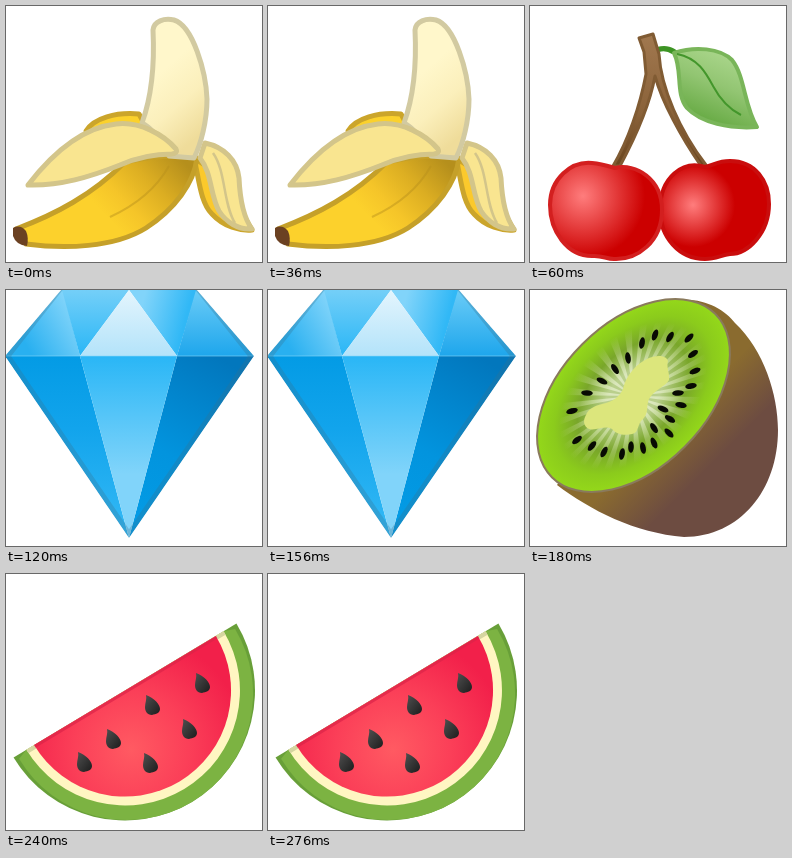
An HTML page that plays this animation: 256x256 px, repeating every 300 ms.

```html
<!DOCTYPE html>
<html lang="en">
<head>
<meta charset="utf-8">
<title>Fruit reel</title>
<style>
html, body { margin: 0; width: 100%; height: 100%; overflow: hidden; background: #fff; }
svg { display: block; width: 100vw; height: 100vh; }
.icon { visibility: hidden; animation: show 300ms step-end infinite; animation-delay: calc(var(--i) * 60ms - 300ms); }
@keyframes show {
  0% { visibility: visible; }
  20%, 100% { visibility: hidden; }
}
</style>
</head>
<body>
<svg viewBox="0 0 256 256" xmlns="http://www.w3.org/2000/svg">
  <defs>
    <linearGradient id="flesh" gradientUnits="userSpaceOnUse" x1="150" y1="70" x2="198" y2="125">
      <stop offset="0" stop-color="#fff7cb"/><stop offset=".5" stop-color="#fbefbb"/><stop offset="1" stop-color="#efdc9a"/>
    </linearGradient>
    <linearGradient id="peel" gradientUnits="userSpaceOnUse" x1="172" y1="150" x2="104" y2="214">
      <stop offset="0" stop-color="#b58f1c"/><stop offset=".4" stop-color="#dcae22"/><stop offset=".75" stop-color="#f5c529"/><stop offset="1" stop-color="#fcd12c"/>
    </linearGradient>
    <radialGradient id="cherryL" gradientUnits="userSpaceOnUse" cx="53" cy="190" r="62">
      <stop offset="0" stop-color="#ff7d7d"/><stop offset="1" stop-color="#cc0000"/>
    </radialGradient>
    <radialGradient id="cherryR" gradientUnits="userSpaceOnUse" cx="163" cy="199" r="42">
      <stop offset="0" stop-color="#ff7d7d"/><stop offset="1" stop-color="#cc0000"/>
    </radialGradient>
    <linearGradient id="stem" x1="0" x2="0" y1="0" y2="1">
      <stop offset="0" stop-color="#a1784f"/><stop offset=".6" stop-color="#8a6239"/><stop offset="1" stop-color="#69451f"/>
    </linearGradient>
    <linearGradient id="leaf" x1=".7" y1=".1" x2=".35" y2=".9">
      <stop offset="0" stop-color="#a9d58a"/><stop offset=".45" stop-color="#92c572"/><stop offset="1" stop-color="#68ab45"/>
    </linearGradient>
    <linearGradient id="gemL" x1="0" x2="0" y1="0" y2="1">
      <stop offset="0" stop-color="#039be5"/><stop offset=".4" stop-color="#12a4ec"/><stop offset="1" stop-color="#35baf6"/>
    </linearGradient>
    <linearGradient id="gemM" x1="0" x2="0" y1="0" y2="1">
      <stop offset="0" stop-color="#29b6f6"/><stop offset=".65" stop-color="#81d4fa"/><stop offset="1" stop-color="#81d4fa"/>
    </linearGradient>
    <linearGradient id="gemR" x1=".7" x2=".3" y1="0" y2="1">
      <stop offset="0" stop-color="#0277bd"/><stop offset=".6" stop-color="#0294de"/><stop offset="1" stop-color="#039be5"/>
    </linearGradient>
    <linearGradient id="gemTop" x1="0" x2="0" y1="0" y2="1">
      <stop offset="0" stop-color="#e4f5fd"/><stop offset="1" stop-color="#b3e3fa"/>
    </linearGradient>
    <linearGradient id="gemUp" x1="0" x2="0" y1="0" y2="1">
      <stop offset="0" stop-color="#74cff8"/><stop offset="1" stop-color="#29b6f6"/>
    </linearGradient>
    <linearGradient id="gemSide" gradientUnits="userSpaceOnUse" x1="20" y1="55" x2="70" y2="25">
      <stop offset="0" stop-color="#29b0f0"/><stop offset="1" stop-color="#81d4fa"/>
    </linearGradient>
    <linearGradient id="gemIn" gradientUnits="userSpaceOnUse" x1="140" y1="0" x2="184" y2="12">
      <stop offset="0" stop-color="#81d4fa"/><stop offset="1" stop-color="#31b8f6"/>
    </linearGradient>
    <linearGradient id="gemOut" x1="0" x2="0" y1="0" y2="1">
      <stop offset="0" stop-color="#6bccf7"/><stop offset="1" stop-color="#1ea6ec"/>
    </linearGradient>
    <linearGradient id="skin" gradientUnits="userSpaceOnUse" x1="106" y1="106" x2="196" y2="196">
      <stop offset=".35" stop-color="#8a6b2f"/><stop offset=".8" stop-color="#6d4c41"/>
    </linearGradient>
    <radialGradient id="pulp">
      <stop offset=".3" stop-color="#b9cf8c"/><stop offset=".58" stop-color="#79a62a"/><stop offset=".82" stop-color="#8bcb1c"/><stop offset="1" stop-color="#94d81a"/>
    </radialGradient>
    <radialGradient id="ray" gradientUnits="userSpaceOnUse" cx="0" cy="0" r="1">
      <stop offset=".35" stop-color="#e6efcc" stop-opacity=".75"/><stop offset="1" stop-color="#d5e8a5" stop-opacity="0"/>
    </radialGradient>
    <radialGradient id="melon" gradientUnits="userSpaceOnUse" cx="125" cy="175" r="115">
      <stop offset="0" stop-color="#ff5a62"/><stop offset=".5" stop-color="#fb3f58"/><stop offset="1" stop-color="#f2204a"/>
    </radialGradient>
    <linearGradient id="pip" x1="0" x2="1" y1="0" y2="1">
      <stop offset="0" stop-color="#505050"/><stop offset="1" stop-color="#1c1c1c"/>
    </linearGradient>
    <clipPath id="gemClip"><path d="M55 0H191L248 66L123 248L-1 66Z"/></clipPath>
  </defs>

  <g class="icon" style="--i:0" stroke-width="5" stroke-linejoin="round">
    <path d="M80 125C88 112 110 106 133 108L145 130L95 148Z" fill="#fbd12c" stroke="#cba52b"/>
    <path d="M188 152C193 172 194 196 206 208C218 221 234 225 246 224L215 170Z" fill="#fbc92c" stroke="#cba52b"/>
    <path d="M10 223C50 208 86 189 119 156C145 150 170 148 191 152C188 177 169 203 140 222C108 242 58 243 20 238Z" fill="url(#peel)" stroke="#c5a029"/>
    <path d="M163 160C150 183 130 199 104 211" fill="none" stroke="#b58f1c" stroke-width="2" opacity=".45"/>
    <path d="M7 222Q14 218 20 225Q23 232 21 240Q10 239 7 230Z" fill="#6b4122"/>
    <path d="M147 24C148 15 158 12 168 14C187 20 200 66 201 93C201 115 195 138 188 152L163 150C155 133 145 122 136 117C144 95 149 65 147 24Z" fill="url(#flesh)" stroke="#d2caa1"/>
    <path d="M22 179C42 153 73 122 110 118C134 115 158 129 170 143Q172 147 166 148C145 148 130 152 114 159C84 171 54 180 22 179Z" fill="#f9e590" stroke="#d3c58a"/>
    <path d="M199 137C218 141 231 154 233 172C234 194 237 211 246 223C232 224 220 216 213 205C204 189 206 167 194 152Z" fill="#f9e590" stroke="#d3c58a"/>
    <path d="M207 147C220 165 217 198 229 217" fill="none" stroke="#d3c58a" stroke-width="2.5"/>
  </g>

  <g class="icon" style="--i:1" stroke-linejoin="round">
    <path d="M127 41C138 38 146 42 151 49L142 48Q136 44 129 46Z" fill="#3d9424"/>
    <path d="M144 47C165 40 190 42 202 54C215 70 214 100 227 121C200 123 171 117 157 102C145 87 153 65 144 47Z" fill="url(#leaf)" stroke="#79b559" stroke-width="4"/>
    <path d="M147 48C168 52 176 67 183 80C191 95 201 104 211 109" fill="none" stroke="#43962b" stroke-width="2"/>
    <path d="M83 160C98 135 110 100 116 68L114 46L109 32L123 28L129 48C131 82 150 125 176 159L171 160C151 131 132 96 125 70C120 98 105 132 90 160Z" fill="url(#stem)" stroke="#805b33" stroke-width="3"/>
    <path d="M175 161C184 159 188 155 200 155C225 155 239 175 239 198C239 227 218 248 200 248C191 249 186 253 175 253C149 253 130 231 130 204C130 171 153 154 175 161Z" fill="url(#cherryR)" stroke="#c90d0d" stroke-width="4"/>
    <path d="M85 162C106 157 132 173 132 204C132 236 107 254 84 253C76 253 72 249 62 250C37 250 20 225 20 199C20 173 41 155 62 157C72 158 78 160 85 162Z" fill="url(#cherryL)" stroke="#d31f1f" stroke-width="4"/>
  </g>

  <g class="icon" style="--i:2">
    <g clip-path="url(#gemClip)">
      <path d="M55 0H57L74 66H-1Z" fill="url(#gemSide)"/>
      <path d="M56 0H123L74 66Z" fill="url(#gemUp)"/>
      <path d="M123 0H191L171 66Z" fill="url(#gemIn)"/>
      <path d="M190 0H191L248 66H171Z" fill="url(#gemOut)"/>
      <path d="M123 0L171 66H74Z" fill="url(#gemTop)"/>
      <path d="M-1 66H74L123 248Z" fill="url(#gemL)"/>
      <path d="M171 66H248L123 248Z" fill="url(#gemR)"/>
      <path d="M74 66H171L123 248Z" fill="url(#gemM)"/>
      <path d="M0 66H247" stroke="#8ad9fb" stroke-width="1.2" opacity=".6"/>
      <path d="M55 -6H191L248 66L123 248L-1 66Z" fill="none" stroke="#35728e" stroke-width="10" opacity=".3"/>
    </g>
  </g>

  <g class="icon" style="--i:3">
    <path d="M150 10C175 8 195 20 205 33C234 60 248 105 248 140C248 200 210 247 154 247C105 243 60 220 27 195Z" fill="url(#skin)"/>
    <ellipse rx="115.5" ry="72.5" transform="translate(103.5 105.5) rotate(-45)" fill="url(#pulp)" stroke="#8a7a5c" stroke-width="2"/>
    <g id="rays" transform="translate(103 106) rotate(-45) scale(87 58)" fill="url(#ray)"/>
    <path d="M56 125C59 118 65 116 72 114C83 112 90 106 93 99C96 85 107 73 119 68C127 65 136 65 138 71C136 77 140 83 139 90C136 96 123 101 119 109C116 116 119 123 113 129C107 134 109 143 102 144C94 146 86 144 82 139C75 135 66 141 59 139C53 136 53 130 56 125Z" fill="#dce67c"/>
    <g id="seeds" fill="#080a03"/>
  </g>

  <g class="icon" style="--i:4" transform="translate(119 116.5) rotate(-31)">
    <path d="M-130 0A130 130 0 0 0 130 0Z" fill="#689f38"/>
    <path d="M-126 4A126 126 0 0 0 126 4L115 0H-115Z" fill="#7cb342"/>
    <path d="M-115 0A115 115 0 0 0 115 0Z" fill="#fff6c2"/>
    <path d="M-115 0H-106V4H-115ZM106 0H115V4H106Z" fill="#d5d5a0"/>
    <g transform="rotate(31) translate(-119 -116.5)">
      <path d="M28.1 171.1A106 106 0 0 0 209.9 61.9Z" fill="url(#melon)"/>
    </g>
    <path d="M-106 1.5H106" stroke="#dc2448" stroke-width="3" opacity=".7"/>
    <g id="pips" fill="url(#pip)" transform="rotate(31) translate(-119 -116.5)"/>
  </g>
</svg>
<script>
const add = (id, tag, attrs) => {
  const el = document.createElementNS('http://www.w3.org/2000/svg', tag);
  for (const k in attrs) el.setAttribute(k, attrs[k]);
  document.getElementById(id).append(el);
};

// Pale wedges fanning out from the kiwi core
const rays = 30;
for (let i = 0; i < rays; i++) {
  const a = i / rays * 2 * Math.PI, w = 0.05;
  const at = t => `${Math.cos(t).toFixed(3)} ${Math.sin(t).toFixed(3)}`;
  add('rays', 'path', { d: `M0 0L${at(a - w)}L${at(a + w)}Z` });
}

const seeds = [
  [125, 45], [140, 47], [159, 48], [112, 53], [163, 64], [98, 68], [165, 81], [85, 79], [161, 96],
  [72, 91], [148, 103], [57, 103], [151, 115], [42, 121], [133, 119], [140, 129], [124, 138], [139, 143],
  [47, 150], [62, 156], [74, 162], [92, 164], [101, 157], [113, 158], [124, 153]
];
for (const [x, y] of seeds) {
  const turn = Math.atan2(y - 106, x - 103) * 180 / Math.PI;
  add('seeds', 'ellipse', { rx: 5.8, ry: 2.8, transform: `translate(${x} ${y}) rotate(${turn.toFixed(1)})` });
}

for (const [x, y] of [[78, 188], [107, 165], [146, 131], [196, 109], [183, 155], [144, 189]])
  add('pips', 'path', { d: 'M-6 -10C2 -7 8 -1 8 4C8 8 4 9 0 10C-5 10 -7 6 -7 2C-7 -2 -5 -6 -6 -10Z', transform: `translate(${x} ${y})` });
</script>
</body>
</html>
```
